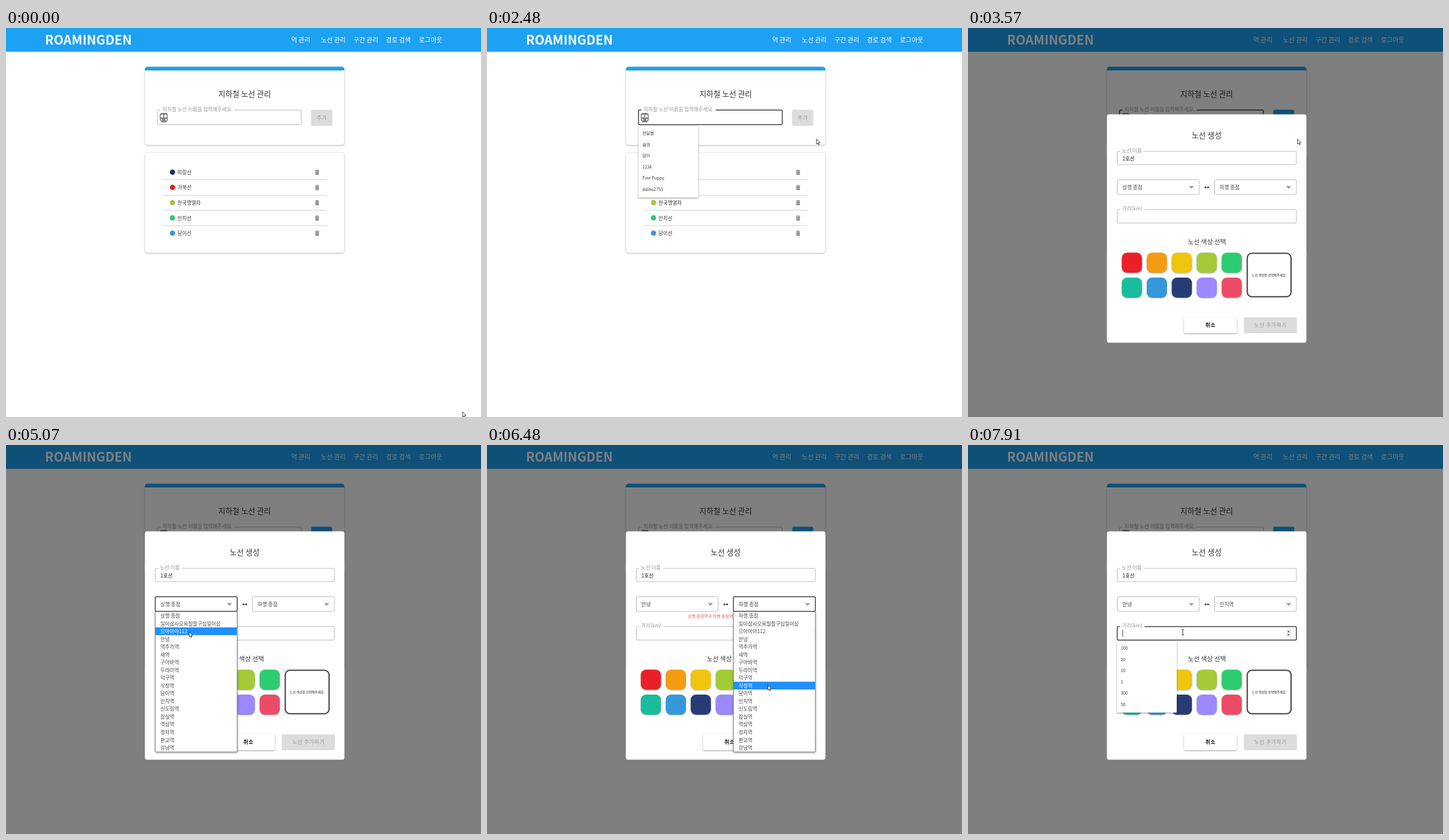
Recreate the animation shown at these times as an HTML page with a canvas. Size 826x678 px, loop 8 s.

```html
<!DOCTYPE html>
<html lang="ko">
<head>
<meta charset="utf-8">
<title>노선 관리</title>
<style>
  html, body { margin: 0; width: 100%; height: 100%; overflow: hidden; background: #fff; }
  canvas { display: block; width: 826px; height: 678px; }
</style>
</head>
<body>
<canvas id="stage" width="826" height="678"></canvas>
<script>
const ctx = document.getElementById('stage').getContext('2d');
const FONT = '"Noto Sans CJK KR", "Noto Sans CJK", "Noto Sans", sans-serif';
const LOOP = 8000;
const BLUE = '#1da1f2', DARK = '#3a3a3a', LINE = '#b4b9b6', BODY = 8.85;

// Moments at which the interface changes, in ms
const AT = {
  focusName: 930, filter: 2710, type: 2950, enable: 3000, modal: 3570,
  open1: 4510, close1: 5390, open2: 6150, close2: 6960, focusDistance: 7600
};
const TYPING = [[2710, '1'], [2950, '1ㅎ'], [3030, '1호'], [3110, '1홋'], [3190, '1호서'], [3260, '1호선']];
const POINTER = [
  [70, 794, 669], [850, 374, 156], [1010, 374, 156], [1390, 573, 193.5],
  [3960, 573, 193.5], [4430, 322, 281], [4560, 320, 284], [4830, 318, 312], [4920, 318, 316],
  [5070, 318.5, 325.5], [5150, 319.5, 332], [5560, 319.5, 332],
  [5930, 482, 279], [6150, 483, 281], [6480, 488.5, 418.5], [6800, 491, 446],
  [7040, 491, 446], [7520, 376, 326.5], [7750, 375, 326.5], [7910, 373.5, 326.5]
];
const LINES = [['띠링선', '#1a3259'], ['거북선', '#ea2027'], ['천국행열차', '#a8c43e'],
  ['인치선', '#2fc476'], ['담이선', '#3498db']];
const STATIONS = ['일이삼사오육칠팔구십일이삼', '으아아아112', '안녕', '역추가역', '새역', '구아바역', '두라미역',
  '덕구역', '삭정역', '담이역', '인치역', '신도림역', '잠실역', '역삼역', '정자역', '판교역', '강남역'];
const SWATCHES = ['#ea2027', '#f39c12', '#f1c40f', '#a3cb38', '#2ecc71',
  '#1abc9c', '#3498db', '#273c75', '#9c88ff', '#ed4c67'];
const NAV = [['역 관리', 496], ['노선 관리', 547.5], ['구간 관리', 604], ['경로 검색', 660.5], ['로그아웃', 718]];
const TRAIN = new Path2D('M12 2c-4.42 0-8 .5-8 4v9.5C4 17.43 5.57 19 7.5 19L6 20.5v.5h12v-.5L16.5 19c1.93 0 3.5-1.57 3.5-3.5V6c0-3.5-3.58-4-8-4z' +
  'M6 6h5v5H6zM13 6h5v5h-5zM6 15.5a1.5 1.5 0 1 0 3 0a1.5 1.5 0 1 0-3 0zM15 15.5a1.5 1.5 0 1 0 3 0a1.5 1.5 0 1 0-3 0z');

const within = (t, from, to) => t >= from && t < to;
const clamp01 = v => Math.max(0, Math.min(1, v));

function text(str, x, midY, { size = BODY, weight = 400, color = '#333', align = 'left', spacing = 0 } = {}) {
  ctx.font = `${weight} ${size}px ${FONT}`;
  ctx.letterSpacing = spacing + 'px';
  ctx.textAlign = align;
  ctx.fillStyle = color;
  ctx.fillText(str, x, midY + size * 0.37);
  const width = ctx.measureText(str).width;
  ctx.letterSpacing = '0px';
  return width;
}

function rect(x, y, w, h, color) {
  ctx.fillStyle = color;
  ctx.fillRect(x, y, w, h);
}

function box(x, y, w, h, r, { fill, stroke, lineWidth = 1, shadow, blur = 2, drop = 1 } = {}) {
  ctx.save();
  ctx.beginPath();
  ctx.roundRect(x, y, w, h, r);
  if (shadow) {
    ctx.shadowColor = shadow;
    ctx.shadowBlur = blur;
    ctx.shadowOffsetY = drop;
  }
  if (fill) { ctx.fillStyle = fill; ctx.fill(); }
  ctx.shadowColor = 'transparent';
  if (stroke) { ctx.strokeStyle = stroke; ctx.lineWidth = lineWidth; ctx.stroke(); }
  ctx.restore();
}

function polygon(points, fill, stroke) {
  ctx.beginPath();
  points.forEach(([x, y]) => ctx.lineTo(x, y));
  ctx.closePath();
  if (fill) { ctx.fillStyle = fill; ctx.fill(); }
  if (stroke) { ctx.strokeStyle = stroke; ctx.lineWidth = 0.9; ctx.stroke(); }
}

function field(x, y, w, h, focused, label, labelX, notchEnd) {
  box(x, y, w, h, 2, { stroke: focused ? DARK : LINE, lineWidth: focused ? 1.5 : 1 });
  if (!label) return;
  rect(x + 5, y - 2, notchEnd - x - 5, 4, '#fff');
  text(label, labelX, y - 1.5, { color: '#959595' });
}

function caret(x, y, h) { rect(x, y, 0.9, h, '#222'); }

function button(label, x, y, w, h, fill, color, weight, shadow) {
  box(x, y, w, h, 2.5, { fill, shadow, blur: 2.5 });
  text(label, x + w / 2 + 0.3, y + h / 2, { size: 9, weight, color, align: 'center', spacing: 0.65 });
}

function trash(x, y) {
  const gray = '#858585';
  rect(x - 1.5, y - 4.5, 3, 1, gray);
  rect(x - 3.5, y - 3.7, 7, 1.2, gray);
  box(x - 3, y - 2, 6, 6.5, [0, 0, 1, 1], { fill: gray });
  for (const dx of [-1.4, 0.8]) rect(x + dx, y - 0.8, 0.6, 4, '#ddd');
}

function card(y, h) {
  box(241.5, y, 347, h, 5, { fill: '#fff', stroke: '#e3e7e6', shadow: 'rgba(0,0,0,.35)', blur: 2.5 });
}

function suggestions(x, y, items) {
  box(x, y, 104, 124.5, 1.5, { fill: '#fff', shadow: 'rgba(0,0,0,.45)', blur: 3 });
  items.forEach((s, i) => text(s, x + 6.7, y + 12.6 + i * 19.52, { size: 7.3 }));
}

function typedText(t) {
  return TYPING.reduce((now, [at, s]) => t >= at ? s : now, '');
}

function nameField(t) {
  const focused = within(t, AT.focusName, AT.open1);
  const hovered = within(t, 800, AT.focusName);
  field(263.5, 143, 250, 25.5, focused || hovered, '지하철 노선 이름을 입력해주세요.', 272, 397.5);
  ctx.save();
  ctx.translate(263.9, 146.3);
  ctx.scale(0.87, 0.87);
  ctx.fillStyle = '#858585';
  ctx.fill(TRAIN, 'evenodd');
  ctx.restore();

  const typed = typedText(t);
  const width = text(typed, 286, 156.5, { color: '#222' });
  if (typed.length > 1) {
    const head = ctx.measureText(typed.slice(0, -1)).width;
    rect(286 + head, 162, width - head, 0.8, '#222');
  }
  const blinkOn = within(t, AT.focusName, 1390) || within(t, 1930, 2480) || t >= AT.filter;
  if (focused && blinkOn) caret(286.3 + width, 149.5, 13.5);
}

function page(t) {
  rect(0, 0, 826, 678, '#fff');
  rect(0, 0, 826, 41.5, BLUE);
  text('ROAMINGDEN', 69 - 1.2, 21, { size: 22.2, weight: 700, color: '#fff' });
  for (const [label, x] of NAV) text(label, x, 20.8, { size: 11.1, weight: 500, color: '#fff' });

  card(68, 136);
  box(241.5, 67.5, 347, 6.5, [5, 5, 0, 0], { fill: BLUE });
  text('지하철 노선 관리', 415, 115, { size: 13.3, weight: 500, align: 'center' });
  nameField(t);
  button('추가', 530.5, 142.5, 37, 28, '#dcdcdc', '#999', 500);
  const enabled = clamp01((t - AT.enable) / 200);
  if (enabled) {
    ctx.globalAlpha = enabled;
    rect(530, 142, 38, 29, '#fff');
    button('추가', 531, 142.5, 36, 27, BLUE, '#fff', 700, 'rgba(0,0,0,.3)');
    ctx.globalAlpha = 1;
  }

  card(217, 175);
  LINES.forEach(([name, color], i) => {
    const y = 251.3 + i * 26.55;
    ctx.beginPath();
    ctx.arc(289.5, y, 4.6, 0, 7);
    ctx.fillStyle = color;
    ctx.fill();
    text(name, 298, y + 0.3);
    trash(541, y + 0.2);
    if (i < 4) rect(272, Math.round(y + 12.8), 286, 1, '#cfd3d1');
  });

  if (within(t, AT.focusName, AT.type)) {
    suggestions(263.5, 171, t < AT.filter
      ? ['한달봄', '솔멍', '담이', '1234', 'Fine Puppy', 'dalbo2753'] : ['1234']);
  }
}

function select(x, value, focused) {
  field(x, 264.5, 142.5, 25.5, focused);
  text(value, x + 9, 277.7, { color: '#444' });
  polygon([[x + 124.5, 275.5], [x + 133.5, 275.5], [x + 129, 280.3]], '#999');
}

function optionList(x, first, pointerY) {
  const pitch = 13.53, top = 290.8;
  const hovered = Math.max(0, Math.floor((pointerY - top) / pitch));
  box(x, top - 0.3, 142.5, 244.5, 0, { fill: '#fff', stroke: '#777', shadow: 'rgba(0,0,0,.45)', blur: 4 });
  [first, ...STATIONS].forEach((name, i) => {
    const y = top + pitch * i, on = i === hovered;
    if (on) rect(x + 0.5, y, 141.5, pitch, '#1e90ff');
    text(name, x + 9, y + 7, { size: 8.75, weight: on ? 500 : 400, color: on ? '#fff' : '#444' });
  });
}

function distanceField(t) {
  const focused = t >= AT.focusDistance;
  field(259.5, 316.5, 311.5, 23.5, focused, '거리(km)', 268, 307);
  if (!focused) return;
  caret(268.6, 321.5, 13);
  rect(553, 321.5, 9, 13.5, '#efefef');
  polygon([[555.2, 326.2], [559.8, 326.2], [557.5, 323.6]], '#555');
  polygon([[555.2, 330], [559.8, 330], [557.5, 332.6]], '#555');
}

function swapArrow() {
  rect(412, 277.3, 6.5, 1.1, '#333');
  polygon([[410.8, 277.8], [413.6, 275.6], [413.6, 280]], '#333');
  polygon([[419.6, 277.8], [416.8, 275.6], [416.8, 280]], '#333');
}

function modal(t, pointerY) {
  rect(0, 0, 826, 678, 'rgba(0,0,0,.5)');
  box(241.5, 150.5, 347, 398, 4, { fill: '#fff' });
  text('노선 생성', 415, 187, { size: 13.3, weight: 500, align: 'center' });
  field(259.5, 215, 311.5, 23, false, '노선 이름', 267.5, 306);
  text('1호선', 268.5, 227.5, { color: '#111' });

  select(259.5, t < AT.close1 ? '상행 종점' : '안녕', within(t, AT.open1, AT.open2));
  swapArrow();
  select(428.5, t < AT.close2 ? '하행 종점' : '인치역', within(t, AT.open2, AT.focusDistance));
  if (within(t, AT.close1, AT.close2)) {
    text('상행 종점역과 하행 종점역을 서로 다른 역으로 선택해주시기 바랍니다.', 349, 298.5, { size: 7.3, color: '#f0564a' });
  }
  distanceField(t);

  text('노선 색상 선택', 415.5, 372.7, { size: 11.1, align: 'center' });
  SWATCHES.forEach((fill, i) => box(267.5 + i % 5 * 43.4, i < 5 ? 391.5 : 435, 35, 35, 9,
    { fill, shadow: 'rgba(0,0,0,.35)', blur: 2 }));
  box(485.6, 392.6, 76.2, 75.8, 8, { fill: '#fff', stroke: '#4a4a4a', lineWidth: 2.3 });
  text('노선 색상을 선택해주세요.', 523.7, 430.7, { size: 5.55, weight: 500, color: '#222', align: 'center' });
  button('취소', 375.5, 504, 92, 28, '#fff', '#111', 700, 'rgba(0,0,0,.4)');
  button('노선 추가하기', 479.5, 504.3, 92.5, 27.7, '#dcdcdc', '#999', 500);

  if (within(t, AT.open1, AT.close1)) optionList(259.5, '상행 종점', pointerY);
  if (within(t, AT.open2, AT.close2)) optionList(428.5, '하행 종점', pointerY);
  if (t >= AT.focusDistance) suggestions(259, 342, ['100', '20', '10', '1', '300', '50']);
}

function pointerAt(t) {
  const next = POINTER.findIndex(p => p[0] > t);
  if (next === 0) return POINTER[0].slice(1);
  if (next < 0) return POINTER[POINTER.length - 1].slice(1);
  const [t0, x0, y0] = POINTER[next - 1], [t1, x1, y1] = POINTER[next];
  const k = (t - t0) / (t1 - t0);
  return [x0 + (x1 - x0) * k, y0 + (y1 - y0) * k];
}

function pointer(t, x, y) {
  const overName = t < AT.modal && x > 263 && x < 514 && y > 143 && y < 169;
  const overDistance = t > AT.close2 && y > 316 && y < 340;
  if (overName || overDistance) {
    rect(x - 0.4, y - 4.5, 0.9, 9, '#222');
    for (const dy of [-5, 4]) rect(x - 2, y + dy, 4.2, 0.9, '#222');
    return;
  }
  const shape = [[0, 0], [0, 8.8], [2, 7.1], [3.4, 10], [4.7, 9.4], [3.4, 6.5], [6, 6.2]];
  polygon(shape.map(([dx, dy]) => [x + dx, y + dy]), '#fff', '#222');
}

function draw(now) {
  const t = now % LOOP;
  const [x, y] = pointerAt(t);
  page(t);
  if (t >= AT.modal) modal(t, y);
  pointer(t, x, y);
}

const start = performance.now();
function tick() {
  draw(performance.now() - start);
  requestAnimationFrame(tick);
}
tick();
</script>
</body>
</html>
```
